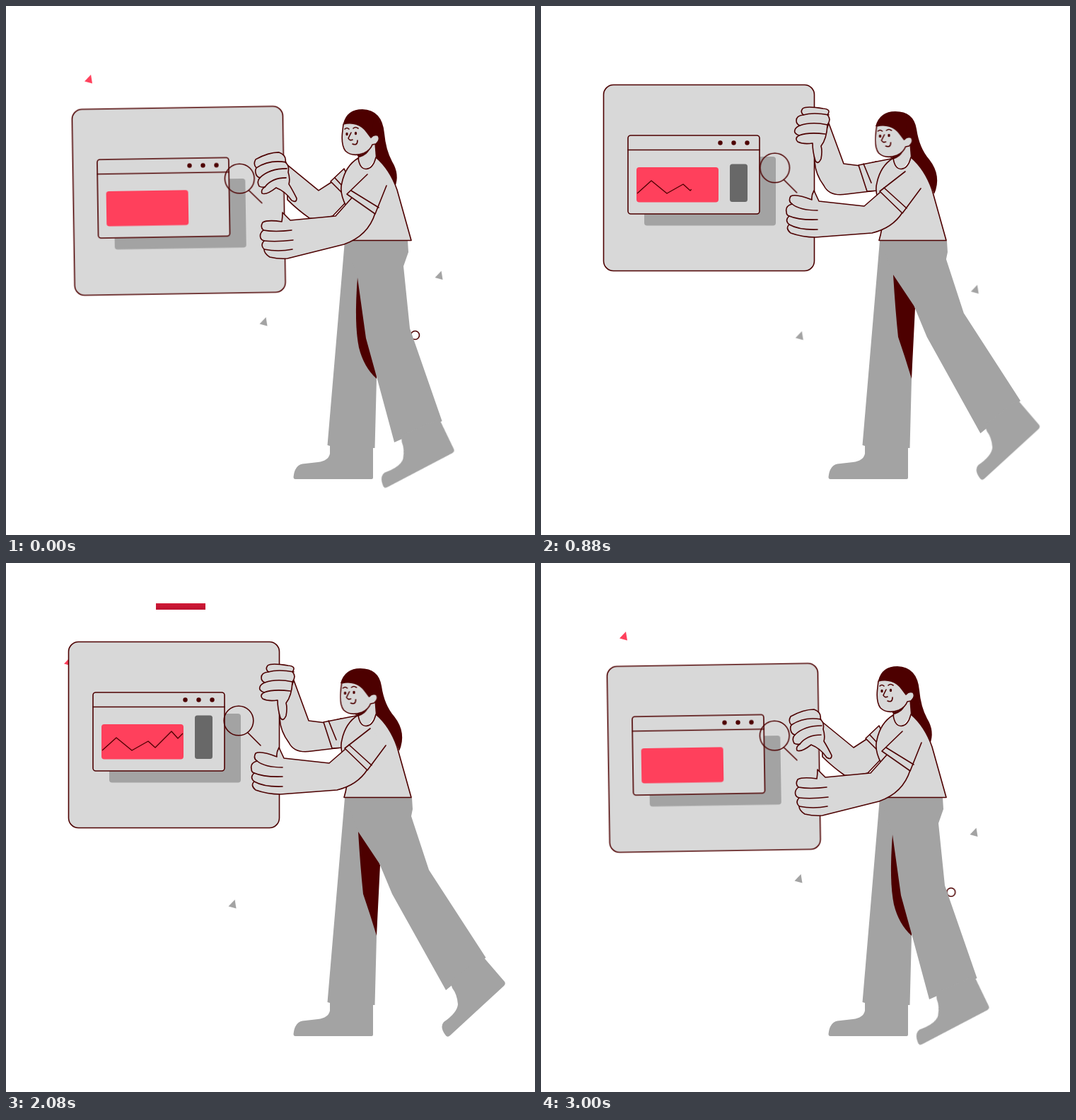
An HTML page without scripts that plays this animation: 748 px wide and 748 px high, repeating every 3.04 s.

```html
<!DOCTYPE html>
<html lang="en">
<head>
<meta charset="utf-8">
<title>Moving a dashboard</title>
<style>
html, body { margin: 0; width: 100%; height: 100%; overflow: hidden; background: #fff; }
svg { display: block; width: 100%; height: 100%; }
svg * { animation-duration: 3040ms; animation-iteration-count: infinite; animation-timing-function: linear; }
.ink { fill: none; stroke: #4d0000; stroke-width: 1.6; stroke-linejoin: round; stroke-linecap: round; }
.skin { fill: #d8d8d8; }
.grey { fill: #a3a3a3; }
.dark { fill: #4d0000; }
.red { fill: #ff405c; }

/* two-pose morph: --a at rest, --b lifted */
.pose { animation-name: pose; }
@keyframes pose {
  0%, 98.68%, to { d: var(--a); animation-timing-function: cubic-bezier(.33,.3,.6,1); }
  21.05%, 72.37% { d: var(--b); animation-timing-function: cubic-bezier(.35,.1,.6,.95); }
}
.head { animation-name: head; }
@keyframes head {
  0%, 98.68%, to { transform: none; animation-timing-function: cubic-bezier(.33,.3,.6,1); }
  21.05%, 72.37% { transform: translate(-2.5px, 3px); animation-timing-function: cubic-bezier(.35,.1,.6,.95); }
}
/* the far hand swings out along an arc */
.arc { animation-name: arc; }
@keyframes arc {
  0%, 21.05%, 72.37%, 98.68%, to { transform: translate(0, 0); animation-timing-function: ease-in-out; }
  9.21%, 82.89% { transform: translate(-5px, -4px); animation-timing-function: ease-in-out; }
}

.board { transform-origin: 237.5px 243px; animation-name: board; }
@keyframes board {
  0%, 98.68%, to { transform: translate(6.8px, 32.5px) rotate(-.9deg); }
  9.21% { transform: translate(1.9px, 13.3px) rotate(-.35deg); }
  14.47% { transform: translate(.5px, 4.5px) rotate(-.1deg); }
  21.05%, 72.37% { transform: translate(0px, 0px) rotate(0deg); }
  77.63% { transform: translate(.2px, 4px) rotate(-.5deg); }
  82.89% { transform: translate(1.3px, 12.7px) rotate(-.9deg); animation-timing-function: ease-out; }
}
.lens { animation-name: lens; }
@keyframes lens {
  0%, 13%, 82%, to { transform: translate(-2px, -4px); }
  19.74% { transform: translate(0, 0); }
  40.79% { transform: translate(10.5px, 27px); animation-timing-function: ease-in-out; }
  50% { transform: translate(12px, 30px); animation-timing-function: ease-in-out; }
  68.42% { transform: translate(3px, 6px); }
}
.chart { stroke-width: 1.3; stroke-linecap: butt; stroke-dasharray: 1 2; animation-name: chart; }
@keyframes chart {
  0%, 16.5%, 92%, to { stroke-dashoffset: 1; visibility: hidden; }
  16.6% { stroke-dashoffset: 1; visibility: visible; }
  19.74% { stroke-dashoffset: .82; }
  36%, 73.5% { stroke-dashoffset: 0; visibility: visible; }
  82.89% { stroke-dashoffset: .41; }
  91.9% { stroke-dashoffset: 1; visibility: visible; }
}
.column { animation-name: column; }
@keyframes column {
  0%, 16%, 95%, to { y: 277px; height: 0; }
  19.74% { y: 260.5px; height: 16.5px; }
  31%, 73% { y: 215.5px; height: 61.5px; }
  82.89% { y: 232.5px; height: 44.5px; }
}

.leg { animation-name: leg; }
@keyframes leg {
  0%, 98.68%, to { d: path("M480 332H568L569 348L562 368L571 456L616.500 587L549 617L525 528L509 470L497 384Z"); }
  9.21% { d: path("M480 332H570L571 348L566.500 362L581 444L641.500 578L578 614L526 474L506 392L498 380Z"); }
  19.74% { d: path("M480 332H573L574 347L571 358L594 439L668.500 564L609 607L540 470L519 410L498 380Z"); animation-timing-function: ease-out; }
  31%, 72.37% { d: path("M480 332H574L575 348L573 358L598 434L678.500 558L622 604L546 468L528 425L498 380Z"); animation-timing-function: ease-in; }
  82.89% { d: path("M480 332H572L573 347L569 360L588 441L659 570L597 610L533 470L512 402L498 380Z"); animation-timing-function: ease-out; }
}
.shoe { animation-name: shoe; }
@keyframes shoe {
  0%, 98.68%, to { transform: translate(616px, 587px) rotate(15deg); }
  9.21% { transform: translate(641px, 578px) rotate(9deg); }
  19.74% { transform: translate(668px, 564px) rotate(3deg); animation-timing-function: ease-out; }
  31%, 72.37% { transform: translate(678px, 558px) rotate(0deg); animation-timing-function: ease-in; }
  82.89% { transform: translate(659px, 570px) rotate(5deg); animation-timing-function: ease-out; }
}

.drift { animation-name: drift; }
@keyframes drift {
  0%, 98.68%, to { transform: translate(0, 0); }
  9.21% { transform: translate(2px, 6.5px); }
  19.74% { transform: translate(4px, 13px); }
  40.79% { transform: translate(-2px, 28.5px); }
  55% { transform: translate(-25px, 36px); }
  68.42% { transform: translate(-44px, 36px); }
  82.89% { transform: translate(-25px, 18px); }
}
.drift2 { animation-name: drift2; }
@keyframes drift2 {
  0%, 98.68%, to { transform: translate(0, 0); }
  9.21% { transform: translate(1px, 16px); }
  19.74% { transform: translate(2px, 27px); }
  40.79% { transform: translate(-2px, 38px); }
  68.42% { transform: translate(-29px, 36px); }
  82.89% { transform: translate(-18.5px, 18px); }
}
.ring { animation-name: ring; }
@keyframes ring {
  0% { transform: translate(0, 0); }
  40% { transform: translate(-6px, 0); }
  98.68%, to { transform: translate(1.3px, 0); }
}

.bar { transform-box: fill-box; transform-origin: center; animation-name: early; }
.late { animation-name: late; }
.last { animation-name: last; }
@keyframes early {
  0%, 36%, 65%, to { transform: scaleX(0); }
  42%, 56% { transform: scaleX(1); }
}
@keyframes late {
  0%, 43%, 67%, to { transform: scaleX(0); }
  50%, 60% { transform: scaleX(1); }
}
@keyframes last {
  0%, 48%, 78%, to { transform: scaleX(0); }
  56%, 71% { transform: scaleX(1); }
}
</style>
</head>
<body>
<svg viewBox="0 0 748 748" xmlns="http://www.w3.org/2000/svg">
  <defs>
    <path id="tri" d="M0 0L-9 9.500L2 12.500Z"/>
    <linearGradient id="bar" x2="0" y2="1"><stop stop-color="#d01a36"/><stop offset="1" stop-color="#bd1230"/></linearGradient>
  </defs>

  <!-- floating bits -->
  <use href="#tri" x="120" y="97" class="red drift2"/>
  <g class="grey drift"><use href="#tri" x="367.500" y="440"/><use href="#tri" x="615.500" y="374.500"/></g>
  <g class="grey">
    <rect class="bar" x="90" y="530.500" width="65" height="9.500" rx="1"/>
    <rect class="bar" x="402" y="260.500" width="66" height="9.500" rx="1"/>
    <rect class="bar late" x="634" y="643.500" width="65" height="9.500" rx="1"/>
  </g>
  <rect class="bar last" x="212" y="57" width="70" height="9" fill="url(#bar)"/>
  <circle class="ink ring" cx="578.500" cy="465.500" r="6"/>

  <!-- legs -->
  <path class="grey" d="M479 332L454.500 621L458 622V633Q456 643 441 645L419 647.500Q408 650 406.500 666Q406.500 669 409 669H517Q519 669 519 667V625H521.500L524 527L530 332Z"/>
  <path class="dark pose" style="--a:path('M497 384Q492 450 499 483Q506 511 524 527L529 427L510 384Z');--b:path('M498 380Q501 430 505 468Q515 497 524 527L529 427L510 380Z')"/>
  <path class="grey leg"/>
  <path class="grey shoe" d="M-4 -2L27 34Q29 37 26 40L-50 110Q-54 114 -57 109Q-65 98 -59 91Q-40 78 -39 66Q-40 52 -47 43L-50 34Z"/>

  <!-- board -->
  <g class="board">
    <rect class="ink skin" x="88.500" y="111.500" width="298" height="263" rx="14"/>
    <rect class="grey" x="146" y="213" width="186" height="97.500" rx="4"/>
    <rect class="ink skin" x="123" y="183" width="186" height="111" rx="4"/>
    <path class="ink" d="M123 203.500H309"/>
    <g class="dark"><circle cx="253.500" cy="193.500" r="3.200"/><circle cx="272.500" cy="193.500" r="3.200"/><circle cx="291.500" cy="193.500" r="3.200"/></g>
    <rect class="red" x="135" y="228" width="116" height="49.500" rx="4"/>
    <path class="ink chart" pathLength="1" d="M136 265L156 247L178 265L201 252L211 261L234 238L243 248L250 241"/>
    <rect class="column" x="267" y="215.500" width="25" height="61.500" rx="3.500" fill="#686868"/>
    <g class="ink lens"><circle cx="326" cy="217" r="20.800"/><path d="M339 234L357 252"/></g>
  </g>

  <!-- far arm -->
  <path class="ink skin pose" style="--a:path('M398 225L442 261L462 248L480 240V278L462 297Q442 302 429 300Q412 288 398 274L397 240Z');--b:path('M407 166L428 223L452 226L474 220V261L432 266Q408 270 400 254Q388 238 387 220L396 195Z')"/>
  <path class="ink skin pose" style="--a:path('M459 248L478 230L490 255L474 263Z');--b:path('M449 225L495 216L478 261L461 262Z')"/>
  <path class="ink pose" style="--a:path('M465 243L477 256');--b:path('M456 223L467 250')"/>
  <g class="arc">
    <path class="ink skin pose" style="--a:path('M399 235Q401 226 395 221Q397 211 386 207Q371 207 353 217Q349 224 354 229Q352 232 353 236Q354 242 359 243Q354 248 358 255Q362 257 366 256Q360 260 362 265Q368 268 382 257Q395 262 404 275Q411 279 411 272Q405 260 400 252Q402 244 399 235Z');--b:path('M405 168Q411 160 405 154Q411 146 399 145Q375 141 370 145Q366 150 371 154Q361 155 361 162Q361 167 366 169Q357 173 359 179Q361 182 365 183Q358 187 363 192Q371 196 384 194Q384 206 388 219Q392 225 396 216Q398 205 396 198Q404 188 405 168Z')"/>
    <path class="ink pose" style="--a:path('M354 229Q372 217 396 221M359 243Q372 230 397 230M366 256Q376 243 396 243');--b:path('M371 154Q385 150 407 154M366 169Q383 163 405 168M365 183Q378 178 402 181')"/>
  </g>

  <!-- head and shirt -->
  <path class="dark pose" style="--a:path('M477 166Q482 146 504 146Q532 147 535 180Q537 203 546 220Q557 238 550 256Q540 240 522 214L518 195L500 166Z');--b:path('M473 170Q479 149 501 149Q527 149 531 174Q535 201 549 217Q567 240 556 266Q548 242 522 214L516 197L498 169Z')"/>
  <path class="skin" d="M498 203V222L510 232L523 216L521 190Z"/>
  <path class="ink" d="M498.500 209V216"/>
  <path class="ink skin" d="M478 331.500Q486 305 481 283Q471 264 475 250Q480 226 498 215Q500 230 509 230.500Q519 230 523 214Q543 231 553 260L573 331.500Z"/>
  <g class="head">
    <path class="dark" d="M496 211Q508 210 514 202Q512 210 500 214Z"/>
    <path class="dark" d="M477 167Q482 148 504 148L520 160L516 186Q500 164 477 167Z"/>
    <path class="ink skin" d="M477 167C490 163 503 168 510 178L516 186Q520 181 526 183Q530 189 523 195L518 196Q515 204 506 208Q490 214 480 205Q474 197 475.500 180Z"/>
    <g class="dark"><ellipse cx="482" cy="181" rx="1.700" ry="2.200"/><ellipse cx="494.500" cy="180" rx="1.700" ry="2.200"/></g>
    <path class="ink" d="M479 174Q482 171 485 174M491 173Q494 170 498 173M488 179L484 187Q486 191 490 189M490 195Q497 198 497 190"/>
  </g>

  <!-- near arm -->
  <path class="ink skin pose" style="--a:path('M491 269L466 297L402 303L391 292Q391 299 390 305Q370 302 363 306Q359 313 364 317Q358 322 360 328Q361 331 365 332Q359 338 365 344Q365 350 373 355Q386 358 398 357L478 337Q512 325 522 293');--b:path('M480 263L457 283L393 276L386 261Q382 268 383 274Q360 265 353 269Q349 276 355 280Q345 283 347 291Q347 296 351 297Q344 303 351 309Q345 314 353 321Q370 327 388 327L468 321Q497 314 511 292')"/>
  <path class="ink pose" style="--a:path('M364 317Q380 320 404 317M365 332Q382 334 406 331M365 344Q385 348 405 344');--b:path('M355 280Q366 289 391 289M351 297Q365 303 391 302M351 309Q365 317 391 316')"/>
  <path class="ink skin pose" style="--a:path('M511 238L482 266L522 294L538 254');--b:path('M515 234L479 262L511 293L537 258')"/>
  <path class="ink pose" style="--a:path('M488 261L527 285');--b:path('M485 257L517 286')"/>
</svg>
</body>
</html>
```
